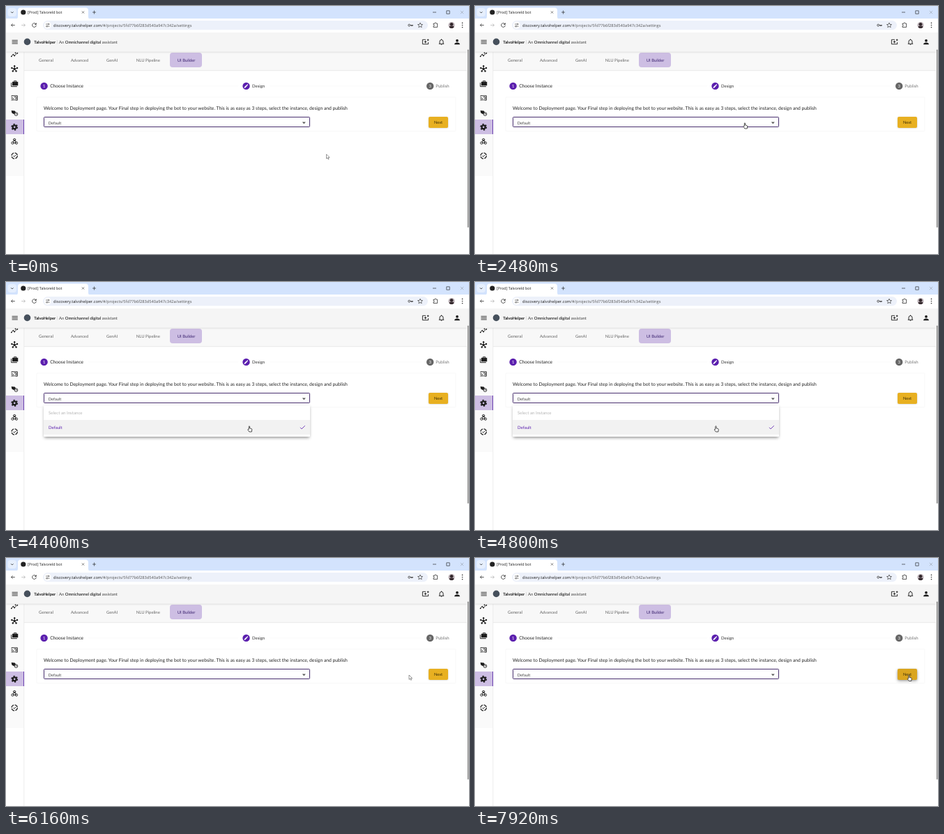
These frames come from a looping animation (664x356 px, 8 s). An HTML page:

```html
<!DOCTYPE html>
<html lang="en">
<head>
<meta charset="utf-8">
<title>Deployment settings</title>
<style>
  html, body { margin: 0; width: 100%; height: 100%; overflow: hidden; background: #fff; }
  svg { display: block; width: 664px; height: 356px; }
  text { font-family: Lato, "Open Sans", sans-serif; text-rendering: geometricPrecision; white-space: pre; }
  text.ui { font-family: "Open Sans", "Noto Sans", sans-serif; }
  .soft { filter: blur(1.2px); }
  .wide { filter: blur(2px); }
</style>
</head>
<body>
<svg id="stage" viewBox="0 0 664 356" xmlns="http://www.w3.org/2000/svg"></svg>
<script>
const INK = '#1c1c1c', GREY = '#666', PURPLE = '#5b1fae', LILAC = '#cdbee3';

const rect = (x, y, w, h, fill, r = 0, more = '') =>
  `<rect x="${x}" y="${y}" width="${w}" height="${h}" rx="${r}" fill="${fill}" ${more}/>`;
const disc = (x, y, r, fill, more = '') =>
  `<circle cx="${x}" cy="${y}" r="${r}" fill="${fill}" ${more}/>`;
const text = (x, y, s, size, fill = INK, more = '') =>
  `<text x="${x}" y="${y}" font-size="${size}" fill="${fill}" ${more}>${s}</text>`;
// Icons are drawn on a 24-unit grid around their centre.
const icon = (x, y, size, body, color = INK, width = 2) =>
  `<g transform="translate(${x} ${y}) scale(${size / 24}) translate(-12 -12)" fill="none"
    stroke="${color}" stroke-width="${width}">${body}</g>`;
const line = d => `<path d="${d}"/>`;
const solid = (d, color = INK) => `<path d="${d}" fill="${color}" stroke="none"/>`;
const dot = (x, y, r, color = INK) => disc(x, y, r, color, 'stroke="none"');

function browserBar() {
  const back = line('M21 12H4M11 5l-7 7 7 7');
  return rect(0, 0, 664, 18.5, '#d3e3fd') + rect(2.5, 3, 12.5, 12, '#e6effd', 4) +
    icon(8.8, 9, 8, line('M7 10l5 5 5-5'), INK, 2.4) +
    '<path d="M14 18.5q3 0 3-3V6.500q0-4 4-4h93q4 0 4 4v9q0 3 3 3z" fill="#fff"/>' +
    disc(24.8, 9, 3.6, '#222') +
    text(31, 10.8, '[Prod] Talvoreld bot', 5.4, INK, 'class="ui"') +
    icon(110.5, 9, 6.5, line('M6 6l12 12M18 6L6 18')) +
    icon(126.5, 9, 7.5, line('M4 12h16M12 4v16')) +
    icon(614.5, 9, 7.5, line('M4 12h16')) +
    icon(634, 9, 7.5, line('M5 5h14v14H5z')) +
    icon(654, 9, 7.5, line('M5 5l14 14M19 5L5 19'), '#9aa3b0') +
    rect(0, 18, 664, 20, '#fff') +
    icon(10, 27.5, 7.5, back, '#333', 2.4) +
    icon(25, 27.5, 7.5, `<g transform="rotate(180 12 12)">${back}</g>`, '#b5b5b5', 2.4) +
    icon(40.5, 27.5, 8.5, line('M19 8a8 8 0 1 0 1 5M20 3v6h-6'), '#333', 2.4) +
    rect(53, 21, 552, 13.2, '#edf1fa', 6.6) + disc(59.8, 27.6, 5, '#fff') +
    icon(59.8, 27.6, 7.5, line('M3 7h8M18 7h3M3 17h3M13 17h8') +
      '<circle cx="15" cy="7" r="3"/><circle cx="9" cy="17" r="3"/>', '#444') +
    text(68, 29.6, 'discovery.talvohelper.com<tspan fill="#555">/#/projects/5fd77b6f283d540a947c342a/settings</tspan>',
      5.7, INK, 'class="ui"') +
    icon(580, 27.6, 8.5, '<circle cx="7" cy="12" r="4"/>' + line('M11 12h12M20 12v4M16 12v4'), '#444', 2.6) +
    icon(594, 27.4, 9, line('M12 3l2.700 6.200 6.600.600-5 4.400 1.500 6.500-5.800-3.400-5.800 3.400 1.500-6.500-5-4.400 6.600-.600z'), '#444') +
    icon(616, 27.4, 9, line('M4 6h5a3 3 0 0 1 6 0h4v14H4v-4a3 3 0 0 0 0-6z'), '#333', 2.2) +
    `<clipPath id="face"><circle cx="639" cy="27.500" r="4.500"/></clipPath><g clip-path="url(#face)">` +
    rect(634, 22, 10, 11, '#b9aeb4') + disc(639, 26.3, 2.3, '#33282c') +
    '<ellipse cx="639" cy="32" rx="4" ry="3.400" fill="#33282c"/></g>' +
    [24.4, 27.5, 30.6].map(y => disc(654.5, y, 0.8, '#333')).join('');
}

function header() {
  return rect(0, 64.6, 661, 1.5, '#999', 0, 'class="soft" opacity=".5"') +
    rect(0, 37.6, 664, 27.9, '#f5f5f5') + rect(0, 37.3, 664, 0.6, '#d8dbe0') +
    icon(12.7, 51.6, 11, line('M3 7h18M3 12h18M3 17h18')) +
    disc(30.5, 51.4, 4.8, '#46505c') +
    text(40.3, 53.9, 'TalvoHelper', 5.8, INK, 'font-weight="700"') +
    rect(73.2, 49, 0.4, 5.6, '#bbb') +
    text(76, 53.9, 'An <tspan fill="#111" font-weight="500">Omnichannel digital</tspan> assistant', 5.87, '#444') +
    icon(601.5, 51.5, 11, line('M13 5H3v14h18v-6M8 12h8M12 8v8M17 6h6M20 3v6')) +
    icon(624.5, 51.5, 11, line('M4 18h16M6.500 18v-7a5.500 5.500 0 0 1 11 0v7M12 3v3') + solid('M10 20h4a2 2 0 0 1-4 0z')) +
    icon(647, 51.5, 11, dot(12, 8, 4) + solid('M4 20v-2c0-2.700 5.300-4 8-4s8 1.300 8 4v2z')) +
    rect(661.2, 38, 2.8, 24.5, '#f4f4f4') + rect(661.9, 62.5, 1.6, 255.5, '#858585', 0.8);
}

function spokes(n, r) {
  let s = '';
  for (let i = 0; i < n; i++) {
    const a = -Math.PI / 2 + i * 2 * Math.PI / n;
    const x = 12 + r * Math.cos(a), y = 12 + r * Math.sin(a);
    s += line(`M12 12L${x} ${y}`) + dot(x, y, 2.6);
  }
  return s;
}

function sidebar() {
  const icons = [
    [70, line('M2 17l6-6 4 4 8-8') + dot(2.5, 17, 2) + dot(8, 11, 2) + dot(12, 15, 2) + dot(21, 7, 2) + solid('M15 3l1 2 2 1-2 1-1 2-1-2-2-1 2-1z')],
    [90.3, spokes(5, 8.8) + dot(12, 12, 3.6)],
    [111.5, solid('M5 6h18v12H5zM10 6V2h8v4h-2V4h-4v2z') + line('M2 9v12h18')],
    [132, line('M3 8V5h18v14h-7M2 19.500h2M2 15a5 5 0 0 1 5 5M2 11a9 9 0 0 1 9 9M11 9h7v6h-4')],
    [153.3, solid('M2 5l11 1 3 4-5 6-7-3z') + disc(17, 16, 5, '#fafafa') + line('M17 13.500V16h2')],
    [173.8, '<circle cx="12" cy="12" r="5.500" stroke-width="5"/><circle cx="12" cy="12" r="9" stroke-width="3.500" stroke-dasharray="4.712"/>'],
    [194.3, '<circle cx="12" cy="7" r="3.600"/><circle cx="6" cy="17" r="3.600"/><circle cx="18" cy="17" r="3.600"/>' + line('M12 7l-5 9M12 7l5 9M8 17h9')],
    [215, '<circle cx="12" cy="12" r="9" stroke-width="2.600" stroke-dasharray="11 3.137"/>' + line('M8 12l3 3 5.500-6')]
  ];
  return rect(0, 66, 25.5, 178, '#fafafa') + rect(25.5, 66, 0.7, 290, '#e4e4e4') +
    rect(0, 163, 25, 21, LILAC) + rect(25, 163, 1, 21, '#6a3fb0') +
    '<clipPath id="side"><path d="M0 66h26v290H0z"/></clipPath><g clip-path="url(#side)">' +
    icons.map(([y, body]) => icon(12.2, y, 11, body)).join('') + '</g>';
}

function tabs() {
  const names = [[47, 'General', 6.1], [93, 'Advanced', 5.8], [144, 'GenAI', 5.85], [186.8, 'NLU Pipeline', 5.95]];
  return rect(26, 66, 635, 26.8, '#f8f8f8') + rect(26, 92.5, 635, 0.6, '#dedede') +
    rect(235, 67, 46, 21, LILAC, 4) +
    names.map(([x, s, size]) => text(x, 79.9, s, size, GREY)).join('') +
    text(245.8, 79.9, 'UI Builder', 5.85, '#3c2470');
}

function page() {
  const step = (x, color) => disc(x, 114.9, 5.2, color);
  return rect(118, 114.7, 215, 0.4, '#f0f0f0') + rect(378, 114.7, 218, 0.4, '#f0f0f0') +
    step(54.6, PURPLE) + step(344.5, PURPLE) + step(608.2, '#666') +
    text(54.6, 117, '1', 5.8, '#fff', 'text-anchor="middle"') +
    text(608.2, 117, '3', 5.8, '#fff', 'text-anchor="middle"') +
    icon(344.5, 114.9, 7.5, solid('M3 17.200V21h3.800L17.800 9.900l-3.700-3.700zM20.700 7a1 1 0 0 0 0-1.400l-2.300-2.300a1 1 0 0 0-1.400 0l-1.900 1.800 3.800 3.800z', '#fff')) +
    text(63.2, 117.1, 'Choose Instance', 6.62, '#222') +
    text(353, 117, 'Design', 6, '#333') + text(616.3, 117, 'Publish', 6.1, '#777') +
    rect(44, 130.8, 601, 49, '#fff', 1, 'stroke="#f4f4f4" stroke-width=".6"') +
    text(54, 149.2, 'Welcome to Deployment page. Your Final step in deploying the bot to your website. This is as easy as 3 steps, select the instance, design and publish', 6.74, '#222') +
    rect(54.5, 159.5, 381, 14, '#fff', 0.8, 'stroke="#49306f" stroke-width="1"') +
    text(60.8, 169.6, 'Default', 5.65, '#444') +
    '<path d="M424.800 166.600h5l-2.500 2.600z" fill="#555"/>' +
    rect(606, 159.8, 28, 15.4, '#777', 2, 'class="soft" opacity=".35"') +
    rect(606, 161, 28, 15.5, '#444', 2, 'class="wide" id="lift"') +
    rect(606, 159, 28, 16, '#e8b021', 2) + rect(606, 159, 28, 16, '#000', 2, 'id="shade"') +
    text(620, 168.8, 'Next', 5.7, '#3a2c08', 'text-anchor="middle"');
}

function menu() {
  return '<g id="menu">' + rect(55, 179, 380, 44.5, '#444', 1, 'class="wide" opacity=".6"') +
    rect(54, 177, 382, 45, '#fff', 1) + rect(54, 198, 382, 21, '#f2f2f2') +
    text(61, 189.8, 'Select an Instance', 6.15, '#b5b5b5') +
    text(61, 211, 'Default', 6, PURPLE) +
    icon(425.3, 208.6, 10, line('M4 12.500l5 5L20.500 6.500'), PURPLE) + '</g>';
}

const pointers = `<g id="pointer">
  <path id="arrow" d="M0 0v6.400l1.500-1.400 1.100 2.400 1-.500-1-2.300h2z" fill="#fff" stroke="#333" stroke-width=".5"/>
  <path id="hand" d="M-1.200 4.500V.300q.600-1.200 1.300 0v2.600l2.500.700q.700.300.600 1.100L2.800 8h-3.400L-2.700 5.200q0-1 .900-.900z" fill="#fff" stroke="#222" stroke-width=".8"/></g>`;

document.getElementById('stage').innerHTML =
  rect(0, 0, 664, 356, '#fff') + tabs() + page() + sidebar() + header() + browserBar() + menu() + pointers;

const [pointer, arrow, hand, list, lift, shade] =
  ['pointer', 'arrow', 'hand', 'menu', 'lift', 'shade'].map(id => document.getElementById(id));

const LOOP = 8000, OPEN = 2840, CLOSE = 4970;
// time, x, y of the pointer tip
const path = [
  [0, 459.5, 212.8], [160, 459.5, 212.8], [960, 236, 158], [1200, 236, 158],
  [1960, 387.5, 168], [3360, 387.5, 168], [4080, 349.5, 207], [4480, 349.5, 207],
  [4800, 346, 207], [5360, 346, 207], [6160, 578, 168], [6440, 578, 168],
  [6740, 612, 168], [6940, 612, 168], [7080, 595.3, 164.3], [7180, 595.3, 164.3],
  [7480, 623, 168.5], [LOOP, 623, 168.5]
];
const clamp = v => Math.max(0, Math.min(1, v));
const smooth = v => v * v * (3 - 2 * v);

function place(t) {
  const i = path.findIndex(p => p[0] > t);
  const [t0, x0, y0] = path[i - 1], [t1, x1, y1] = path[i];
  const k = smooth((t - t0) / (t1 - t0));
  return [x0 + (x1 - x0) * k, y0 + (y1 - y0) * k];
}

function draw(t) {
  const [x, y] = place(t);
  const open = t >= OPEN && t < CLOSE;
  const inside = (l, top, r, bottom) => x >= l && x <= r && y >= top && y <= bottom;
  const link = inside(606, 159, 634, 175) || inside(54, 157.5, 436, 175) ||
    (open && inside(54, 198, 436, 219));
  pointer.setAttribute('transform', `translate(${x} ${y})`);
  arrow.style.display = link ? 'none' : '';
  hand.style.display = link ? '' : 'none';

  const grow = 1 - (1 - clamp((t - OPEN) / 120)) ** 3;
  const fade = 1 - clamp((t - CLOSE) / 100);
  list.setAttribute('opacity', grow * fade);
  list.setAttribute('transform', `translate(0 177) scale(1 ${0.8 + 0.2 * grow}) translate(0 -177)`);

  const ramp = at => clamp((t - at) / 280);
  const hover = ramp(6690) - ramp(7000) + ramp(7300);
  lift.setAttribute('opacity', 0.45 * hover);
  shade.setAttribute('opacity', 0.06 * hover);
}

const start = performance.now();
function tick() {
  draw((performance.now() - start) % LOOP);
  requestAnimationFrame(tick);
}
tick();
</script>
</body>
</html>
```
